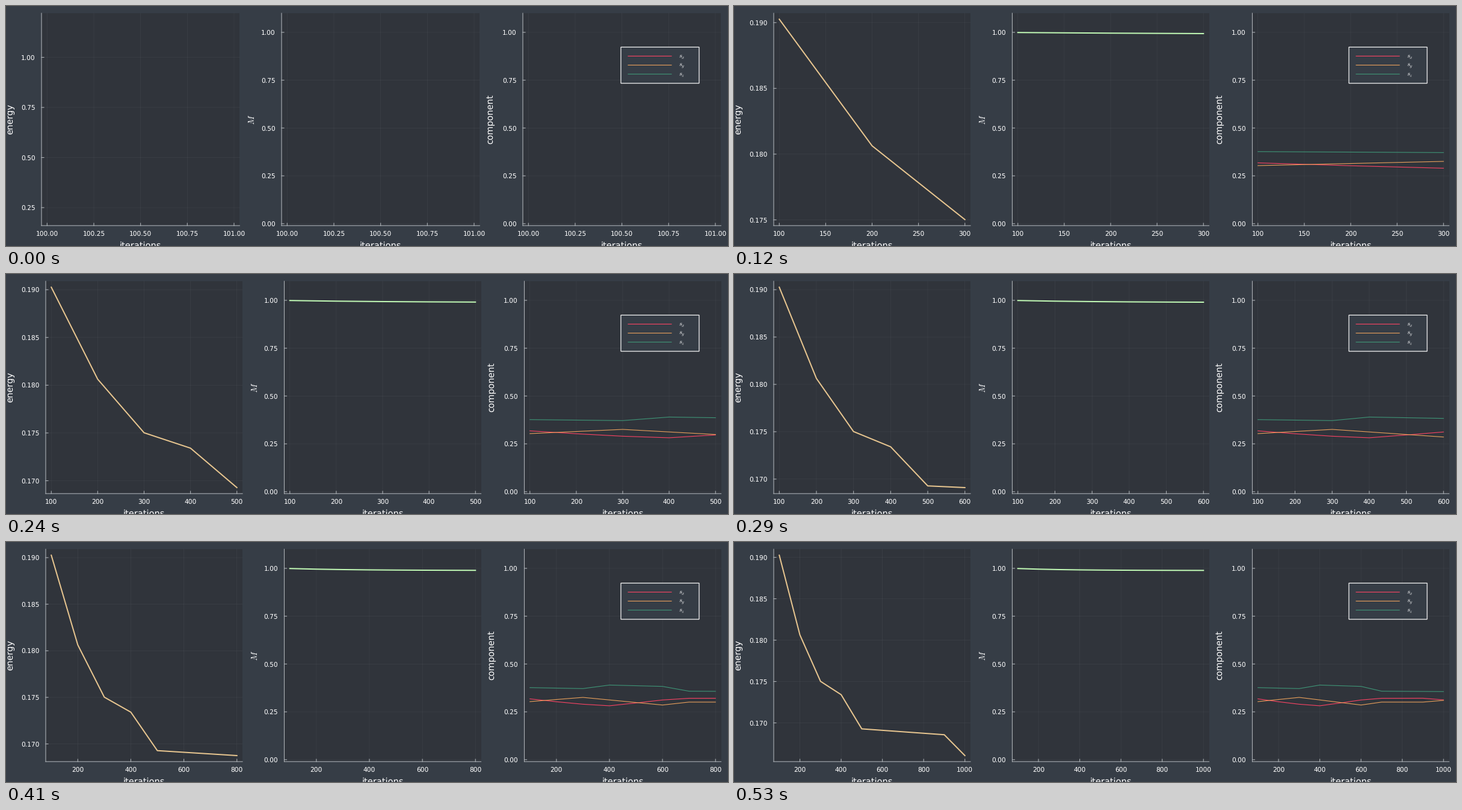
These frames come from a looping animation (1200x400 px, 590 ms). A matplotlib script:

```python
import numpy as np
import matplotlib.pyplot as plt
from matplotlib.animation import FuncAnimation
from matplotlib.patches import Rectangle

W, H, DPI = 1200, 400, 100
TOP, BOTTOM = 12, 366
N = 10
TICK_MS, FRAMES = 10, 59

BG, INSIDE, FG = "#363d46", "#30343b", "#adb2b7"
TAN, MINT = "#e8c690", "#c1fab5"
RED, ORANGE, GREEN = "#fe4365", "#eca25c", "#3f9778"

n = np.arange(N)
steps = 100 * (n + 1)


def knots(*points):
    return np.interp(n, *zip(*points))


energy = knots((0, .19026), (1, .18063), (2, .17502), (3, .17341),
               (4, .16928), (8, .16857), (9, .16605))

# The squared components add up to the squared magnetisation.
m2 = .978 + .02 * np.exp(-n / 2.5)
s_y = knots((0, .3035), (2, .3255), (5, .2857), (6, .301), (8, .301), (9, .310))
s_z = knots((0, .3766), (2, .3716), (3, .390), (5, .383), (6, .358), (9, .356))
s_x = m2 - s_y - s_z

plt.rcParams["font.family"] = "DejaVu Sans"
plt.rcParams["mathtext.fontset"] = "cm"
plt.rcParams["text.hinting"] = "none"
fig = plt.figure(figsize=(W / DPI, H / DPI), dpi=DPI, facecolor=BG)


def pt(px):
    return px * 72 / DPI


def line(ax, x, y, color, width=1.1, z=3, **kw):
    ax.plot(x, y, color=color, lw=pt(width), zorder=z, snap=False, **kw)


def text(ax, x, y, s, px=10.67, ha="center", rot=0):
    ax.text(x, y, s, fontsize=pt(px), color="white", ha=ha, va="baseline",
            rotation=rot, rotation_mode="anchor", zorder=6)


def padded(lo, hi):
    pad = 0.03 * (hi - lo)
    return lo - pad, hi + pad


def ticks(lim, step):
    first, last = np.ceil(lim[0] / step), np.floor(lim[1] / step)
    return np.arange(first, last + 1) * step + 0.0


def x_step(span):
    if span <= 200:
        return span / 4
    return 100 if span <= 600 else 200


def panel(ax, k, left, right, ylim, ystep, yfmt, curves):
    span = 100 * k or 1
    xlim = padded(100, 100 + span)
    sx = lambda v: left + (v - xlim[0]) / (xlim[1] - xlim[0]) * (right - left)
    sy = lambda v: BOTTOM - (v - ylim[0]) / (ylim[1] - ylim[0]) * (BOTTOM - TOP)

    ax.add_patch(Rectangle((left, TOP), right - left, BOTTOM - TOP,
                           fc=INSIDE, ec="none", zorder=1))
    for v in ticks(xlim, x_step(span)):
        x = sx(v)
        line(ax, [x, x], [TOP, BOTTOM], FG, 0.67, 2, alpha=0.1)
        line(ax, [x, x], [BOTTOM - 4, BOTTOM], FG)
        text(ax, x, 382.5, f"{v:.0f}" if k else f"{v:.2f}")
    for v in ticks(ylim, ystep):
        y = sy(v)
        line(ax, [left, right], [y, y], FG, 0.67, 2, alpha=0.1)
        line(ax, [left, left + 4], [y, y], FG)
        text(ax, left - 10.5, y + 4, format(v, yfmt), ha="right")
    line(ax, [left, left], [TOP, BOTTOM], FG)
    line(ax, [left, right], [BOTTOM, BOTTOM], FG)

    if k:
        for data, color, width in curves:
            line(ax, sx(steps[:k + 1]), sy(data[:k + 1]), color, width, 4)
    text(ax, (left + right) / 2, 404, "iterations", 14.67)


def legend(ax):
    ax.add_patch(Rectangle((1022, 68.5), 130, 60.3, fc=BG, ec="white",
                           lw=pt(1.2), zorder=5, snap=False))
    for i, (name, color) in enumerate(zip("xyz", (RED, ORANGE, GREEN))):
        y = 83.5 + 15 * i
        line(ax, [1034, 1106], [y, y], color, z=6)
        text(ax, 1117.5, y + 2.5, f"$s_{name}$", ha="left")


def scene(k):
    ax = fig.add_axes([0, 0, 1, 1], label=f"scene {k}")
    ax.set(xlim=(0, W), ylim=(H, 0))
    ax.axis("off")

    seen = energy[:k + 1]
    if k:
        lefts, width = (66, 462.5, 861.5), 327
        e_lim, e_fmt = padded(seen.min(), seen.max()), ".3f"
        e_step = .002 if k == 1 else .005
    else:
        lefts, width = (59, 458, 859), 329.3
        e_lim, e_fmt, e_step = padded(seen[0], seen[0] + 1), ".2f", .25
    a, b, c = [(x, x + width) for x in lefts]
    unit = (-0.01, 1.1), .25, ".2f"

    panel(ax, k, *a, e_lim, e_step, e_fmt, [(energy, TAN, 2)])
    panel(ax, k, *b, *unit, [(np.sqrt(m2), MINT, 2)])
    panel(ax, k, *c, *unit,
          [(s_x, RED, 1.1), (s_y, ORANGE, 1.1), (s_z, GREEN, 1.1)])

    text(ax, 11, 189, "energy", 14.67, rot=90)
    text(ax, lefts[1] - 45, 189, "$M$", 14.67, rot=90)
    text(ax, lefts[2] - 50, 189, "component", 14.67, rot=90)
    legend(ax)
    return ax


scenes = [scene(k) for k in range(N)]


def show(i):
    # Steps last 60 ms, except the fifth, which lasts 50 ms.
    t = i * TICK_MS
    k = (t + 10 * (t >= 290)) // 60
    for j, ax in enumerate(scenes):
        ax.set_visible(j == k)
    return scenes


anim = FuncAnimation(fig, show, frames=FRAMES, init_func=lambda: show(0),
                     interval=TICK_MS, repeat=True, repeat_delay=0)
plt.show()
```
